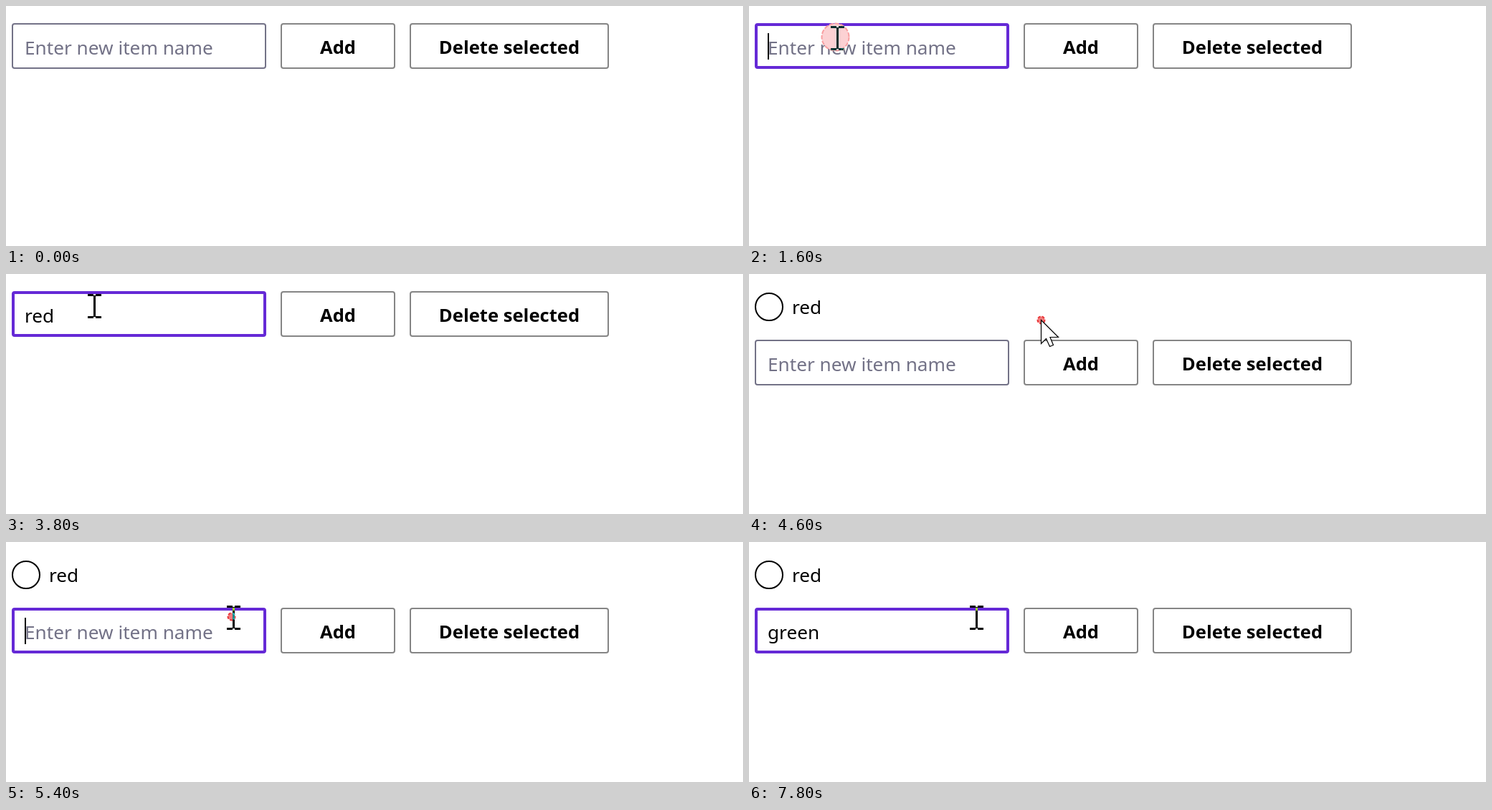
Recreate the animation shown at these times as an HTML page with a canvas. Size 1028 by 336 pixels, loop 8 s.

```html
<!DOCTYPE html>
<html lang="en">
<head>
<meta charset="utf-8">
<title>Item list</title>
<style>
html, body { margin: 0; width: 100%; height: 100%; overflow: hidden; background: #fff; }
canvas { display: block; }
</style>
</head>
<body>
<canvas id="stage" width="1028" height="336"></canvas>
<script>
const ctx = document.getElementById('stage').getContext('2d');
const LOOP = 8000;
const FAMILY = '"Segoe UI", "Open Sans", "Noto Sans", sans-serif';
const REGULAR = `26.2px ${FAMILY}`;
const SEMIBOLD = `600 25.6px ${FAMILY}`;
const GRAY = '#737287', ACCENT = '#6529d6', BUTTON = '#858585';

// Each entry changes only the listed parts of the state from its time on.
const timeline = [
  [0, { typed: '', caret: false, input: 'rest', added: false, hoverAdd: false,
        arrow: null, beam: null, ring: null }],
  [800, { arrow: [128, 8] }],
  [1000, { arrow: null, beam: [124.5, 42], input: 'hover' }],
  [1200, { beam: [123.5, 45] }],
  [1400, { input: 'focus', caret: true, ring: [120.5, 43.5, 0] }],
  [1600, { ring: [120.5, 43.5, 1] }],
  [1800, { ring: null }],
  [2000, { caret: false }],
  [2600, { caret: true }],
  [3000, { typed: 're' }],
  [3400, { typed: 'red' }],
  [3800, { caret: false }],
  [4200, { beam: [265, 55] }],
  [4400, { beam: null, arrow: [407, 64], caret: true, hoverAdd: true }],
  [4600, { typed: '', caret: false, input: 'rest', added: true, hoverAdd: false,
           ring: [407.5, 64.5, 0] }],
  [4800, { ring: [407.5, 64.5, 1] }],
  [5000, { ring: null, arrow: [370, 80] }],
  [5200, { arrow: null, beam: [317.5, 106], input: 'hover' }],
  [5400, { input: 'focus', caret: true, ring: [314.5, 104.5, 0] }],
  [5600, { ring: [314.5, 104.5, 1] }],
  [5800, { ring: null }],
  [6000, { caret: false }],
  [6200, { typed: 'g', caret: true }],
  [6400, { typed: 'gr' }],
  [6600, { typed: 'gree' }],
  [7200, { typed: 'green' }],
  [7800, { caret: false }],
];

function stateAt(time) {
  const past = timeline.filter(([start]) => start <= time);
  return Object.assign({}, ...past.map(([, change]) => change));
}

function box(x, y, w, h, color, line = 2) {
  ctx.strokeStyle = color;
  ctx.lineWidth = line;
  ctx.beginPath();
  ctx.roundRect(x + line / 2, y + line / 2, w - line, h - line, line === 2 ? 3 : 2);
  ctx.stroke();
}

function label(text, x, y, color = '#000', font = REGULAR, align = 'left') {
  ctx.font = font;
  ctx.fillStyle = color;
  ctx.textAlign = align;
  ctx.fillText(text, x, y);
}

function button(text, x, y, w, color) {
  box(x, y, w, 64, color);
  label(text, x + w / 2, y + 43, '#000', SEMIBOLD, 'center');
}

function drawItem(text) {
  ctx.strokeStyle = '#000';
  ctx.lineWidth = 2;
  ctx.beginPath();
  ctx.arc(28, 46, 19, 0, Math.PI * 2);
  ctx.stroke();
  label(text, 60, 56);
}

function drawInput(y, { typed, caret, input }) {
  const color = { rest: GRAY, hover: '#000', focus: ACCENT }[input];
  box(8, y, 355, 64, color, input === 'focus' ? 4 : 2);
  label(typed || 'Enter new item name', 26, y + 44, typed ? '#000' : GRAY);
  if (caret) {
    ctx.fillStyle = '#000';
    ctx.fillRect(26 + Math.round(ctx.measureText(typed).width), y + 14, 2, 37);
  }
}

// The click ring grows from a small red dot to a pale dashed disc.
function drawRing([x, y, grow]) {
  ctx.fillStyle = grow ? '#fcd1d3' : '#f27c7c';
  ctx.strokeStyle = grow ? '#f99fa1' : '#e8383a';
  ctx.lineWidth = 2;
  ctx.setLineDash(grow ? [6, 2] : [4, 2]);
  ctx.beginPath();
  ctx.arc(x, y, grow ? 19 : 5, 0, Math.PI * 2);
  ctx.fill();
  ctx.stroke();
  ctx.setLineDash([]);
}

// The text cursor inverts whatever lies beneath it.
function drawBeam([x, y]) {
  ctx.save();
  ctx.translate(x, y);
  ctx.globalCompositeOperation = 'difference';
  ctx.fillStyle = '#fff';
  for (const top of [-17, 14]) {
    ctx.fillRect(-9.5, top, 8, 3);
    ctx.fillRect(1.5, top, 8, 3);
  }
  ctx.fillRect(-1.5, -15, 3, 30);
  ctx.restore();
}

function drawArrow([x, y]) {
  ctx.save();
  ctx.translate(x + 0.5, y + 0.5);
  ctx.fillStyle = '#fff';
  ctx.strokeStyle = '#000';
  ctx.lineWidth = 1.2;
  ctx.stroke(ctx.fill(new Path2D('M0 0V33L7 26L12 37L17 35L12.5 24H24Z')) ||
    new Path2D('M0 0V33L7 26L12 37L17 35L12.5 24H24Z'));
  ctx.restore();
}

function draw(now) {
  const state = stateAt(now % LOOP);
  const y = state.added ? 92 : 24;
  ctx.fillStyle = '#fff';
  ctx.fillRect(0, 0, 1028, 336);
  if (state.added) drawItem('red');
  drawInput(y, state);
  button('Add', 383, y, 160, state.hoverAdd ? '#000' : BUTTON);
  button('Delete selected', 563, y, 278, BUTTON);
  if (state.ring) drawRing(state.ring);
  if (state.beam) drawBeam(state.beam);
  if (state.arrow) drawArrow(state.arrow);
}

const start = performance.now();
function tick() {
  draw(performance.now() - start);
  requestAnimationFrame(tick);
}
tick();
</script>
</body>
</html>
```
